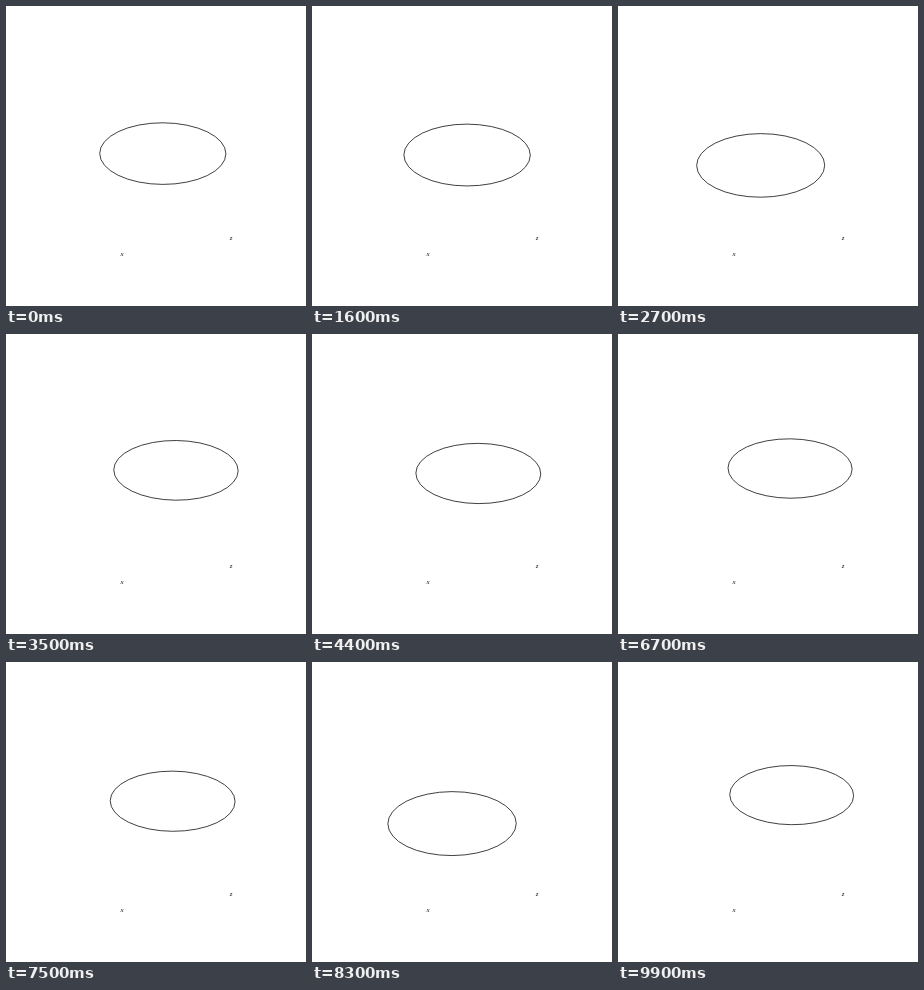
Recreate the animation shown at these times as an HTML page. Size 300 by 300 pixels, loop 10 s.

```html
<!DOCTYPE html>
<html lang="en">
<head>
<meta charset="utf-8">
<title>Oscillating ring</title>
<style>
  html, body { margin: 0; width: 100%; height: 100%; overflow: hidden; background: #fff; }
  svg { display: block; width: 300px; height: 300px; }
  ellipse { fill: none; stroke: #000; stroke-width: 0.75; }
  text { font: italic 7px "Liberation Serif", "Times New Roman", serif; fill: #111; text-anchor: middle; }
</style>
</head>
<body>
<svg viewBox="0 0 300 300">
  <ellipse id="ring" cx="156.8" cy="147.6" rx="63.1" ry="30.8"/>
  <text x="116" y="249.7">x</text>
  <text x="225.2" y="233.9">z</text>
</svg>
<script>
  const ring = document.getElementById("ring");
  const STEP = 100, STEPS = 100;

  // s runs from -1 (near, lower left) to 1 (far, upper right)
  function place(s) {
    const x = 156.8 + 18.85 * s - 0.4 * s * s;
    const y = 147.6 - 15.95 * s + 0.1 * s * s;
    const tilt = 0.024 * (x - 150);
    ring.setAttribute("cx", x);
    ring.setAttribute("cy", y);
    ring.setAttribute("rx", 63.1 - 1.25 * s);
    ring.setAttribute("ry", 30.8 - 1.35 * s);
    ring.setAttribute("transform", `rotate(${tilt} ${x} ${y})`);
  }

  function draw() {
    const step = Math.floor(performance.now() / STEP) % STEPS;
    place(Math.sin(20 * step / (STEPS - 1)));
    requestAnimationFrame(draw);
  }
  draw();
</script>
</body>
</html>
```
